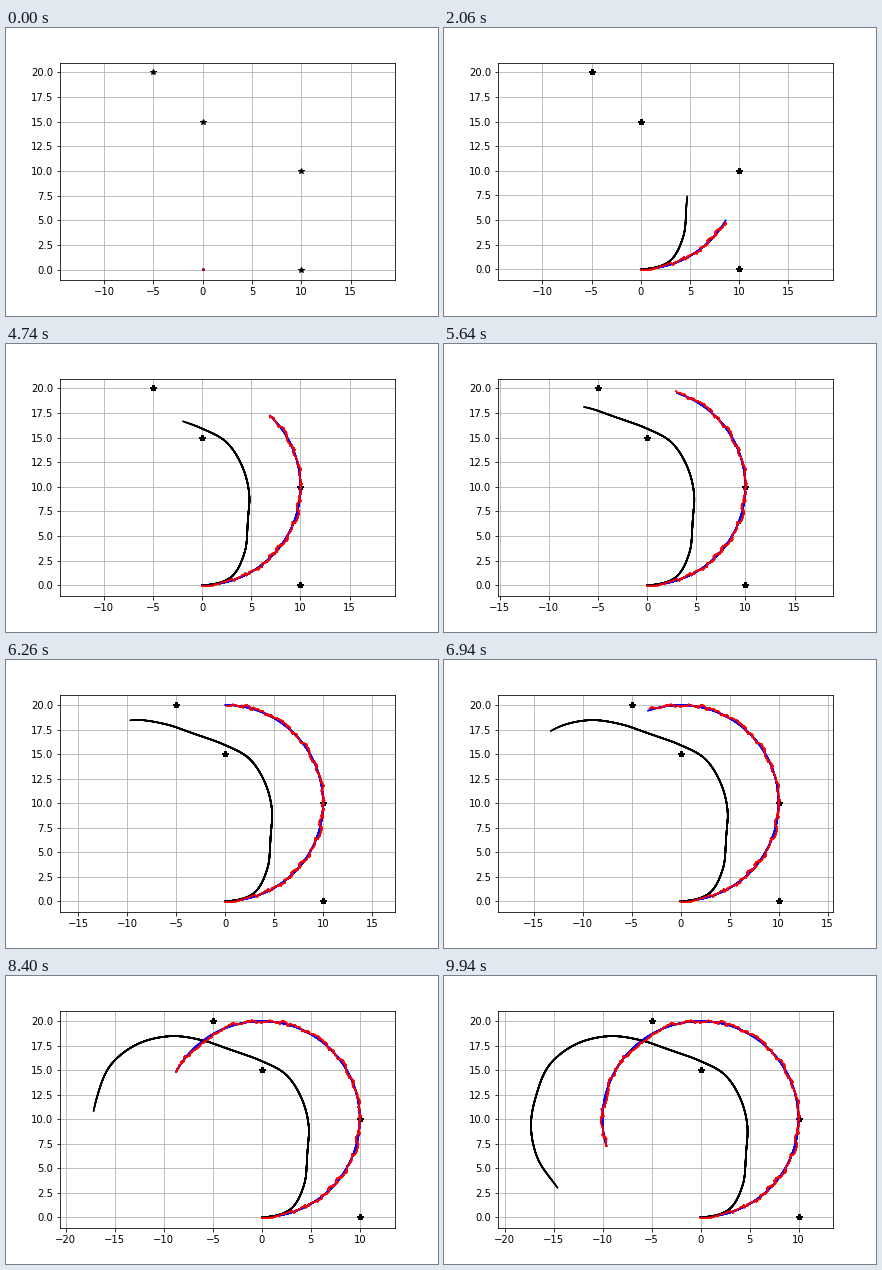
A matplotlib script for the animation above (9.96 s loop, 432 by 288 pixels).

```python
import numpy as np
import matplotlib.pyplot as plt
from matplotlib.animation import FuncAnimation

FRAMES = 498
INTERVAL = 20
MARGIN = 0.05
TURN = 0.01  # radians per step
# Every step is plotted over the earlier ones, which hardens the line edges.
LAGS = [k * k // 2 for k in range(11, -1, -1)]
LANDMARKS = np.array([[10, 0], [10, 10], [0, 15], [-5, 20]], float)

rng = np.random.default_rng(4)
steps = np.arange(FRAMES + 1)


def noise(slow, fast):
    kernel = np.hanning(11)
    drift = rng.normal(0, slow / np.sqrt((kernel ** 2).sum()), steps.size)
    drift = np.convolve(drift, kernel, mode="same")
    return drift + rng.normal(0, fast, steps.size)


def circle(angle, radius):
    return np.column_stack([radius * np.sin(angle), 10 - radius * np.cos(angle)])


def true_path():
    return circle(TURN * steps, 10)


def estimated_path():
    settle = np.minimum(1, steps / 20)
    first_dip = 0.12 * np.exp(-((steps - 5) / 5) ** 2)
    radial = first_dip + settle * noise(0.1, 0.05)
    along = settle * noise(0.005, 0.008)
    return circle(TURN * steps + along, 10 + np.clip(radial, -0.21, 0.21))


def dead_reckoning():
    # Positions at equal time intervals, joined by a cubic curve.
    keys = np.array([
        0, 2.9 + 0.78j, 4.32 + 3.33j, 4.63 + 6.36j, 4.78 + 9.32j,
        4.05 + 12.13j, 2.45 + 14.55j, -0.08 + 15.95j, -2.98 + 17j,
        -6.1 + 18.05j, -9.36 + 18.46j, -12.7 + 17.65j, -15.4 + 15.55j,
        -16.73 + 12.55j, -17.3 + 9.25j, -16.58 + 5.9j, -14.6 + 3j])
    slopes = np.gradient(keys)
    slopes[0] = 3
    t = steps / FRAMES * (len(keys) - 1)
    i = np.minimum(t.astype(int), len(keys) - 2)
    u = t - i
    ease = u * u * (3 - 2 * u)
    z = (keys[i] + ease * (keys[i + 1] - keys[i])
         + u * (1 - u) ** 2 * slopes[i] - u * u * (1 - u) * slopes[i + 1])
    return np.column_stack([z.real, z.imag])


paths = [true_path(), dead_reckoning(), estimated_path()]
spread = np.concatenate(paths, axis=1).reshape(steps.size, -1, 2)
low = np.minimum.accumulate(np.minimum(spread.min(axis=1), LANDMARKS.min(axis=0)))
high = np.maximum.accumulate(np.maximum(spread.max(axis=1), LANDMARKS.max(axis=0)))

plt.rcParams["font.family"] = "DejaVu Sans"
fig = plt.figure(figsize=(6, 4), dpi=72, facecolor="white")
fig.subplots_adjust(left=0.125, right=0.9, bottom=0.125, top=0.88)
ax = fig.add_subplot()
ax.grid(True)
box = ax.get_position()
aspect = box.width * 6 / (box.height * 4)

stars, = ax.plot([], [], "*k")
layers = [(lag, path, ax.plot([], [], "-" + color)[0])
          for lag in LAGS for path, color in zip(paths, "bkr")]


def set_limits(last):
    (x0, y0), (x1, y1) = low[last], high[last]
    pad = MARGIN * (y1 - y0)
    half = aspect * (y1 - y0 + 2 * pad) / 2
    middle = (x0 + x1) / 2
    ax.set_xlim(middle - half, middle + half)
    ax.set_ylim(y0 - pad, y1 + pad)


def draw(frame):
    set_limits(frame + 1)
    stars.set_data(*np.tile(LANDMARKS, (min(frame, 30) + 1, 1)).T)
    for lag, path, line in layers:
        count = frame + 2 - lag if frame >= lag else 0
        line.set_data(*path[:count].T)
    return [stars] + [line for _, _, line in layers]


anim = FuncAnimation(fig, draw, frames=FRAMES, interval=INTERVAL,
                     repeat=True, repeat_delay=0, blit=False)
plt.show()
```
